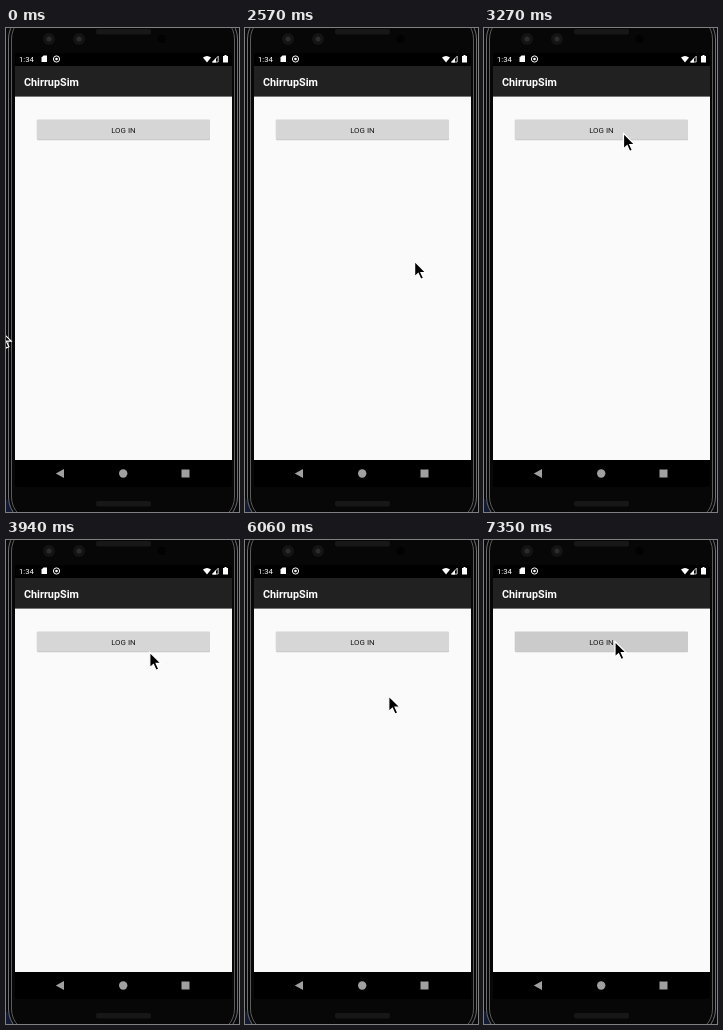
An HTML page for the animation above (8 s loop, 233x484 px).

```html
<!DOCTYPE html>
<html>
<head>
<meta charset="utf-8">
<style>
  html, body { margin: 0; width: 100%; height: 100%; overflow: hidden; background: #08090d; }
  svg { display: block; width: 233px; height: 484px; }
  text { font-family: Roboto, sans-serif; }
  .tip text { font: 13.3px Inter, sans-serif; fill: #f0f0f0; text-anchor: middle; }
  .tip rect { fill: #252525; stroke: #5a5a5a; }
</style>
</head>
<body>
<svg viewBox="0 0 233 484">
  <!-- phone body -->
  <rect width="233" height="484" fill="#08090d"/>
  <path d="M0 470L9 484H0Z" fill="#131b33"/>
  <g fill="#070707">
    <rect x="2.5" y="-16" width="229" height="512" rx="27" stroke="#707070"/>
    <rect x="5.5" y="-13" width="223" height="506" rx="24" stroke="#5c5c5c"/>
  </g>
  <g fill="#171717">
    <rect x="90" y="1" width="55" height="5.5" rx="2"/>
    <rect x="90" y="473" width="55" height="5.5" rx="2"/>
  </g>
  <g fill="#141414">
    <circle cx="43" cy="11" r="6"/>
    <circle cx="73" cy="11" r="6"/>
  </g>
  <g fill="#292d30">
    <circle cx="43" cy="11" r="2.5"/>
    <circle cx="73" cy="11" r="2.5"/>
  </g>
  <circle cx="155.5" cy="11" r="4" fill="#020204"/>

  <!-- screen -->
  <rect x="9" y="25" width="217" height="434" rx="3" fill="#000"/>
  <rect x="9" y="38" width="217" height="31" fill="#212121"/>
  <rect x="9" y="68.6" width="217" height="363.4" fill="#fafafa"/>
  <text x="13" y="34" font-size="7.7" fill="#fff">1:34</text>
  <text x="18" y="58" font-size="10.8" font-weight="700" fill="#fff">ChirrupSim</text>

  <!-- status icons -->
  <g fill="#fff">
    <path d="M37.5 27.5H41V34H35.5V29.5Z"/>
    <circle cx="50.5" cy="31" r="3.1" fill="none" stroke="#fff"/>
    <circle cx="50.5" cy="31" r="1.3"/>
    <path d="M197 29.5Q201 26.5 205 29.5L201 34.5Z"/>
    <path d="M212.2 28.2V34H206.6Z" fill="none" stroke="#fff" stroke-width=".8"/>
    <path d="M206 34.5L210 30V34.5Z"/>
    <path d="M217 28H218.5V27H220.5V28H222V34.5H217Z"/>
  </g>

  <!-- navigation bar -->
  <g fill="#a0a0a0">
    <path d="M49.8 445.5L58 441V450Z"/>
    <circle cx="117.2" cy="445.5" r="4.2"/>
    <rect x="175.5" y="441.5" width="8" height="8"/>
  </g>

  <rect x="31" y="92" width="173" height="20.2" rx="1" fill="#c4c4c4"/>
  <rect id="button" x="30.7" y="91.6" width="173.3" height="20" rx="1"/>
  <text x="117.4" y="104.8" font-size="7.9" text-anchor="middle" fill="#181818">LOG IN</text>

  <!-- dock labels -->
  <g class="tip" id="studio">
    <rect x="157.5" y="471.5" width="113" height="24" rx="4"/>
    <text x="214" y="488.5">Mobile Studio</text>
  </g>
  <g class="tip" id="emulator">
    <rect x="121.5" y="471.5" width="82" height="24" rx="4"/>
    <text x="162.3" y="488.5">emulator</text>
  </g>

  <path id="cursor" d="M0 0V15.5L3.6 12.2L6.2 18L8.9 16.8L6.3 11.2H11.2Z"
    fill="#000" stroke="#fff" stroke-width="1.2"/>
</svg>
<script>
  const LOOP = 8000;
  const $ = id => document.getElementById(id);

  // pointer moves: begin, end, target x, target y
  const moves = [
    [410, 440, -20, 302],
    [820, 930, -6, 302],
    [1320, 1550, 89.5, 75.5],
    [1810, 1980, 170, 234],
    [2570, 2930, 110.5, 121.5],
    [2930, 3440, 142, 104],
    [3940, 4050, 230, 500],
    [5690, 6370, 127, 89],
    [6850, 6980, 131, 101.5]
  ];

  const ramp = (t, a, b) => Math.min(1, Math.max(0, (t - a) / (b - a)));
  const easeOut = k => 1 - (1 - k) ** 2.3;

  function pointer(t) {
    let x = -6, y = 302;
    for (const [begin, end, toX, toY] of moves) {
      const k = easeOut(ramp(t, begin, end));
      x += (toX - x) * k;
      y += (toY - y) * k;
    }
    return [x, y];
  }

  function draw(now) {
    const t = now % LOOP;
    $("cursor").setAttribute("transform", `translate(${pointer(t)})`);
    $("studio").setAttribute("opacity", t >= 4370 && t < 4700 ? 1 : 0);
    $("emulator").setAttribute("opacity", t < 4700 ? 0 : 1 - ramp(t, 5690, 5830));
    const grey = Math.round(214 - 11 * ramp(t, 7120, 7210));
    $("button").setAttribute("fill", `rgb(${grey},${grey},${grey})`);
  }

  const start = performance.now();
  function tick() {
    draw(performance.now() - start);
    requestAnimationFrame(tick);
  }
  tick();
</script>
</body>
</html>
```
